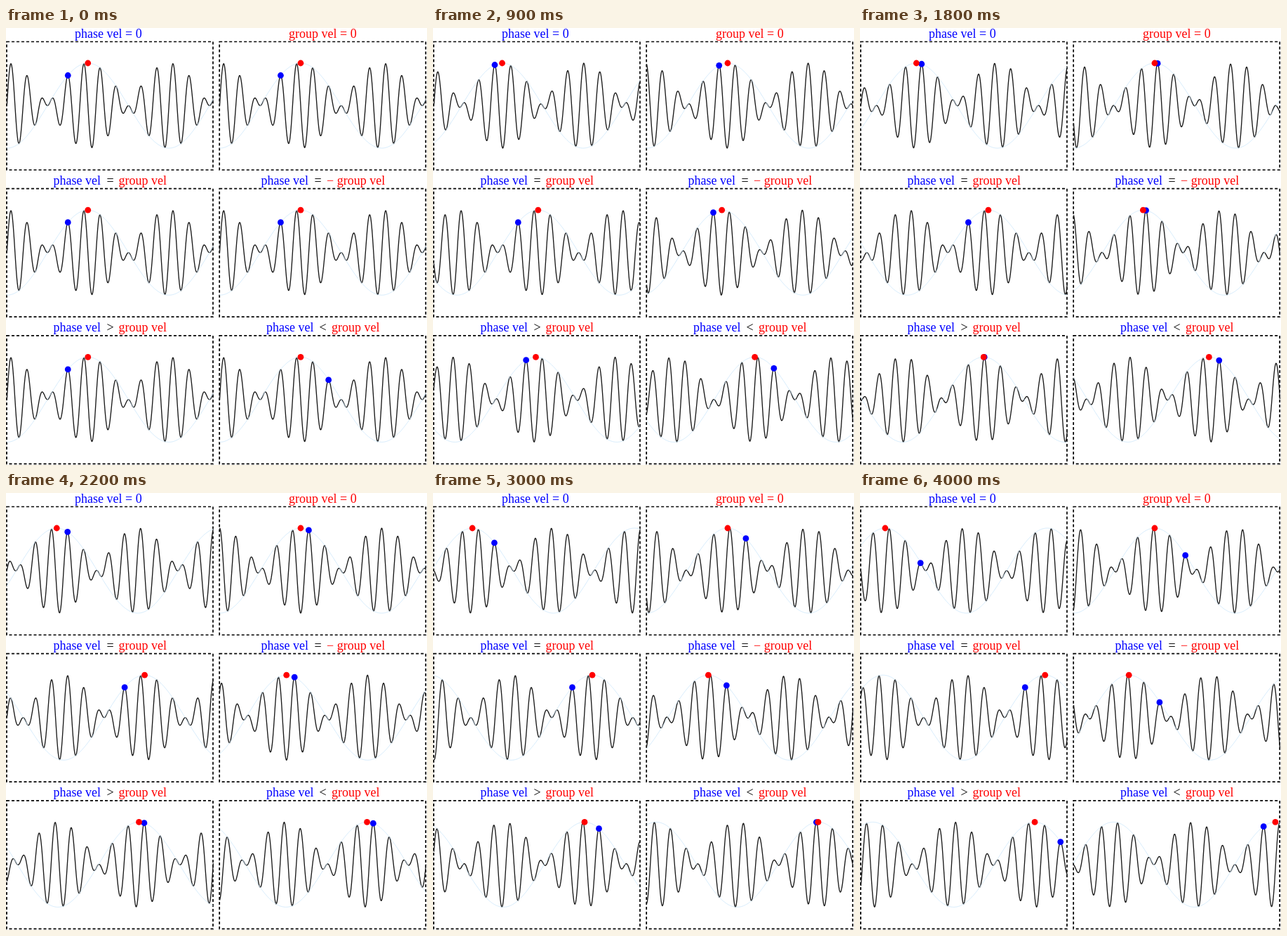
Animation of 600 by 622 pixels, one loop 4100 ms. Source, as an HTML page:

```html
<!DOCTYPE html>
<html>
<head>
<meta charset="utf-8">
<style>
  html, body { margin: 0; width: 100%; height: 100%; overflow: hidden; background: #fff; }
  svg { display: block; }
  text { font: 18px "Liberation Serif", Times, serif; }
  path { fill: none; }
  .box { stroke: #000; stroke-width: 1.7; stroke-dasharray: 4 3; }
  .wave { stroke: #1a1a1a; stroke-width: 1.35; stroke-linejoin: round; }
  .envelope { stroke: #cfe8fb; stroke-width: 0.9; }
</style>
</head>
<body>
<svg id="stage" width="600" height="622" viewBox="0 0 600 622"></svg>
<script>
const STEP_MS = 100, STEPS = 41;
const SCALE = 36.75, SPAN = 8, AMP = 60.5, RATIO = 10;
const BLUE = '#00f', RED = '#f00', BLACK = '#000';
const stage = document.getElementById('stage');

// phase, group: speeds per step; crest: start of the marked crest; labels: [x, text, colour]
const panels = [
  { phase: 0, group: -0.055, labels: [[98, 'phase vel = 0', BLUE]] },
  { phase: 0.05, group: 0, labels: [[403, 'group vel = 0', RED]] },
  { phase: 0.1, group: 0.1,
    labels: [[67.5, 'phase vel', BLUE], [143.5, '=', BLACK], [160.5, 'group vel', RED]] },
  { phase: 0.025, group: -0.025,
    labels: [[363.5, 'phase vel', BLUE], [439.5, '=', BLACK], [457, '− group vel', RED]] },
  { phase: 0.135, group: 0.09,
    labels: [[67.5, 'phase vel', BLUE], [143.5, '>', BLACK], [160.5, 'group vel', RED]] },
  { phase: 0.078, group: 0.117, crest: 1.35 * Math.PI,
    labels: [[371, 'phase vel', BLUE], [446.5, '<', BLACK], [464, 'group vel', RED]] }
];

function add(tag, attrs) {
  const el = document.createElementNS('http://www.w3.org/2000/svg', tag);
  for (const name in attrs) el.setAttribute(name, attrs[name]);
  return stage.appendChild(el);
}

panels.forEach((p, i) => {
  const row = Math.floor(i / 2), left = 1 + (i % 2) * 303.2, top = 19.5 + row * 209.2;
  p.x0 = left + 0.3;
  p.y0 = top + 91;
  p.labels.forEach(([x, text, fill]) =>
    add('text', { x, y: 14 + row * 209, fill }).textContent = text);
  add('path', { class: 'box', d: `M${left} ${top}h294v182.5h-294z` });
  p.wave = add('path', { class: 'wave' });
  p.envelope = add('path', { class: 'envelope' });
  p.blue = add('circle', { r: 4.4, fill: BLUE });
  p.red = add('circle', { r: 4.4, fill: RED });
});

function draw(p, step) {
  const crest = (p.crest || 0.75 * Math.PI) + p.phase * step;
  const peak = Math.PI + p.group * step;
  const envelope = x => Math.cos(x - peak);
  const wave = x => envelope(x) * Math.cos(RATIO * (x - crest));
  const px = x => (p.x0 + x * SCALE).toFixed(2);
  const py = y => (p.y0 - y * AMP).toFixed(2);
  const curve = f => {
    let d = '';
    for (let x = 0; x <= SPAN; x += 1 / 64) d += (d ? 'L' : 'M') + px(x) + ' ' + py(f(x));
    return d;
  };
  const place = (dot, x, y) => {
    dot.setAttribute('cx', px(x));
    dot.setAttribute('cy', py(y));
  };

  // the blue dot rides the true local maximum, slightly off the carrier crest
  let shift = 0;
  for (let i = 0; i < 6; i++)
    shift = -Math.atan(Math.tan(crest + shift - peak) / RATIO) / RATIO;

  p.wave.setAttribute('d', curve(wave));
  p.envelope.setAttribute('d', curve(envelope));
  place(p.blue, crest + shift, wave(crest + shift));
  place(p.red, peak, 1);
}

let shown = -1;
function tick() {
  const step = Math.floor(performance.now() / STEP_MS) % STEPS;
  if (step !== shown) {
    shown = step;
    panels.forEach(p => draw(p, step));
  }
  requestAnimationFrame(tick);
}
tick();
</script>
</body>
</html>
```
